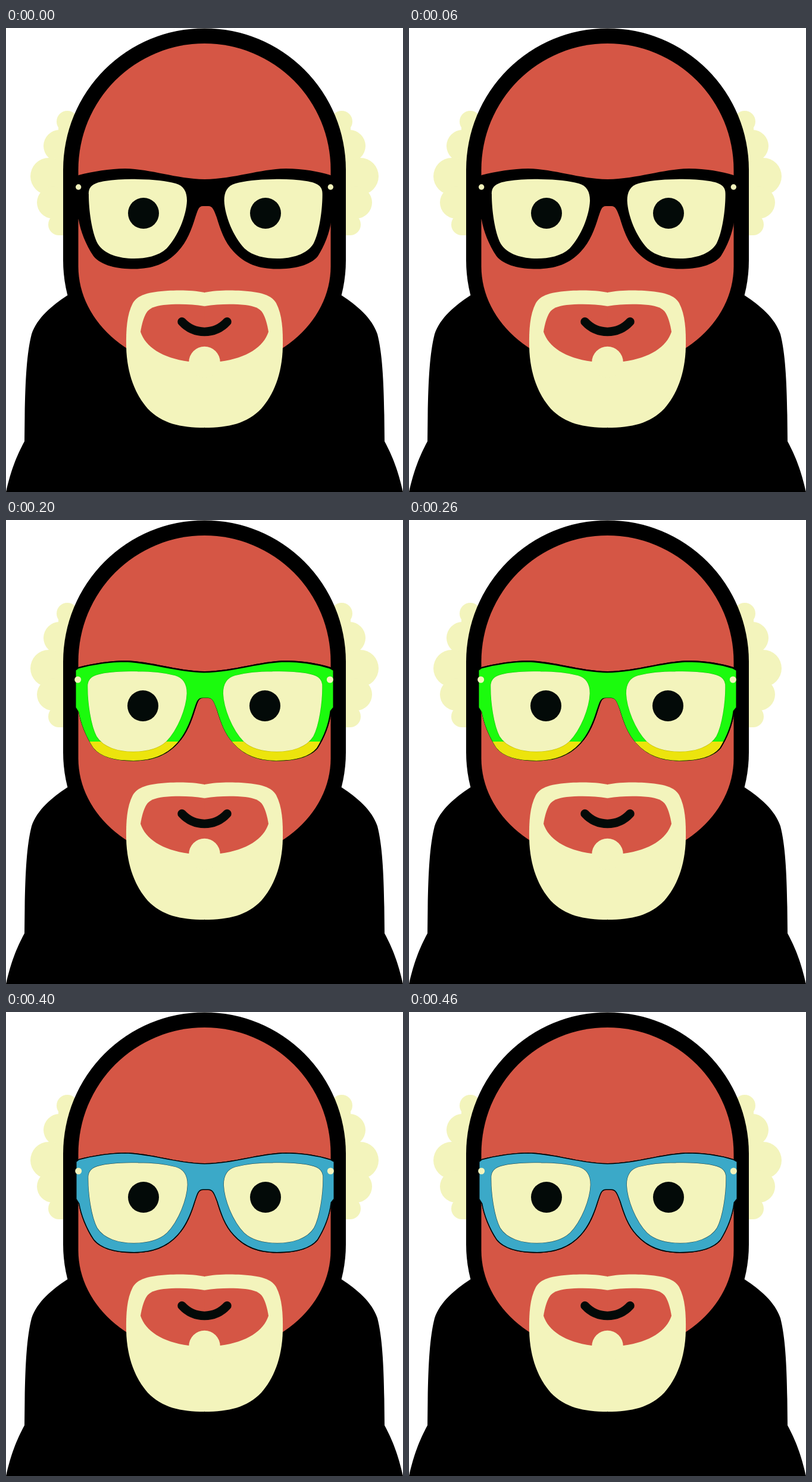
Recreate the animation shown at these times as an HTML page with a canvas. Size 667 px wide and 779 px high, loop 0.5 s.

```html
<!DOCTYPE html>
<html lang="en">
<head>
<meta charset="utf-8">
<title>Changing glasses</title>
<style>
html, body { margin: 0; width: 100%; height: 100%; overflow: hidden; background: #fff; }
canvas { display: block; }
</style>
</head>
<body>
<canvas id="stage" width="667" height="779"></canvas>
<script>
const ctx = document.getElementById('stage').getContext('2d');
const AXIS = 333.5, LENS_AXIS = 335.3, STEP = 100;
const RED = '#d55645', CREAM = '#f3f4bc', INK = '#030a08', YELLOW = '#ece40d';

// Each look: rim colour, offset of the glasses, strength of the lens outline.
const looks = [
  { rim: null, dx: 0, dy: 0 },
  { rim: '#e98b1b', dx: -1, dy: 0, edge: 0.15 },
  { rim: '#1bfb0d', dx: -1, dy: 1, edge: 0.2, lower: YELLOW },
  { rim: YELLOW, dx: 0, dy: 1, edge: 0.4 },
  { rim: '#3ba9c8', dx: 0, dy: 0, edge: 0.6 }
];

const body = new Path2D('M333.5 440 L103 449 C77 466 52 487 43 514 C35 545 32.5 590 31.5 650 L31 694 C17 720 8 744 0 779 H333.5 Z');
const beard = new Path2D('M333.5 444 C315 440 290 440 272 441 C240 443 221 448 213 462 C203 481 201.5 507 202 535 C203 582 218 616 238 639 C262 664 293 671 333.5 671 Z');
const mouthArea = new Path2D('M333.5 467 C310 463 285 463 265 465 C250 467 241 470 236 478 C231 486 228 498 226 510 C234 535 262 554 307 560 H333.5 Z');
const smile = new Path2D('M295.5 493 C316 515.5 351 515.5 371.5 493');
const lens = new Path2D('M139 280 C138 264 149 260 166 257 C185 254 205 253.5 222 254 C248 254 270 257 285 261 C299 265 304 275 304 290 C303 315 289 350 270 370 C256 383 235 387 215 387 C190 387 165 380 154 362 C144 343 139 305 139 280 Z');
const rim = new Path2D('M117 251 L122 247 C145 241 175 236 200 236 C245 237 285 253 333.5 254 C385 253 425 237 470 236 C500 236 525 241 545 247 L552 251 V314 L547 320 C544 345 534 367 524 383 C511 399 484 404.5 455 404.5 C425 404.5 401 396 382 375 C367 359 360 338 354 318 C349 305 347 299 340 299 H331 C323 299 322 307 318 318 C312 338 304 359 289 375 C270 396 245 404.5 215 404.5 C187 404.5 160 399 147 383 C134 364 125 340 122 322 L117 314 Z');
const hair = [[103, 157, 18], [90, 198, 27], [72, 249, 31], [79, 293, 27], [89, 330, 18]];

function fill(path, color) {
  ctx.fillStyle = color;
  ctx.fill(path);
}

function stroke(path, color, width) {
  ctx.strokeStyle = color;
  ctx.lineWidth = width;
  ctx.stroke(path);
}

function disc(x, y, r, color) {
  ctx.fillStyle = color;
  ctx.beginPath();
  ctx.arc(x, y, r, 0, 2 * Math.PI);
  ctx.fill();
}

function bothSides(axis, draw) {
  draw();
  ctx.save();
  ctx.translate(2 * axis, 0);
  ctx.scale(-1, 1);
  draw();
  ctx.restore();
}

function headShape(r, lowerY, lowerR, color) {
  ctx.fillStyle = color;
  ctx.beginPath();
  ctx.arc(AXIS, 238, r, Math.PI, 0);
  ctx.ellipse(AXIS, lowerY, r, lowerR, 0, 0, Math.PI);
  ctx.fill();
}

function drawHair() {
  ctx.fillStyle = CREAM;
  ctx.fillRect(88, 165, 30, 183);
  for (const [x, y, r] of hair) disc(x, y, r, CREAM);
}

function drawGlasses({ rim: color, dx, dy, edge, lower }) {
  fill(rim, '#000');
  ctx.save();
  if (color) {
    ctx.save();
    ctx.clip(rim);
    ctx.translate(dx, dy);
    fill(rim, color);
    if (lower) {
      ctx.save();
      ctx.clip(rim);
      ctx.fillStyle = lower;
      ctx.fillRect(100, 372 - dy, 470, 40);
      ctx.restore();
    }
    stroke(rim, '#000', 3);
    ctx.restore();
  }
  ctx.translate(dx, dy);
  bothSides(LENS_AXIS, () => {
    if (color) {
      stroke(lens, `rgba(20,30,25,${edge})`, 2.8);
      stroke(lens, CREAM, 1.4);
    }
    fill(lens, CREAM);
  });
  bothSides(AXIS, () => {
    disc(231, 311, 26, INK);
    disc(121.7, 267, color ? 5.5 : 4.7, CREAM);
  });
  ctx.restore();
}

function drawBeard() {
  bothSides(AXIS, () => fill(beard, CREAM));
  bothSides(AXIS, () => fill(mouthArea, RED));
  // Cover the hairline seams where the mirrored halves meet.
  ctx.fillStyle = CREAM;
  ctx.fillRect(332.5, 445, 2, 21);
  ctx.fillRect(332.5, 562, 2, 108);
  ctx.fillStyle = RED;
  ctx.fillRect(332.5, 468, 2, 70);
  disc(AXIS, 561, 26.3, CREAM);
  ctx.lineCap = 'round';
  stroke(smile, INK, 14.5);
}

function draw(look) {
  ctx.fillStyle = '#fff';
  ctx.fillRect(0, 0, 667, 779);
  bothSides(AXIS, drawHair);
  bothSides(AXIS, () => fill(body, '#000'));
  ctx.fillStyle = '#000';
  ctx.fillRect(330, 445, 7, 334);
  headShape(237.5, 390, 237.5, '#000');
  headShape(212, 400, 175, RED);
  drawGlasses(look);
  drawBeard();
}

const start = performance.now();
function tick() {
  const elapsed = performance.now() - start;
  draw(looks[Math.floor(elapsed / STEP) % looks.length]);
  requestAnimationFrame(tick);
}
tick();
</script>
</body>
</html>
```
